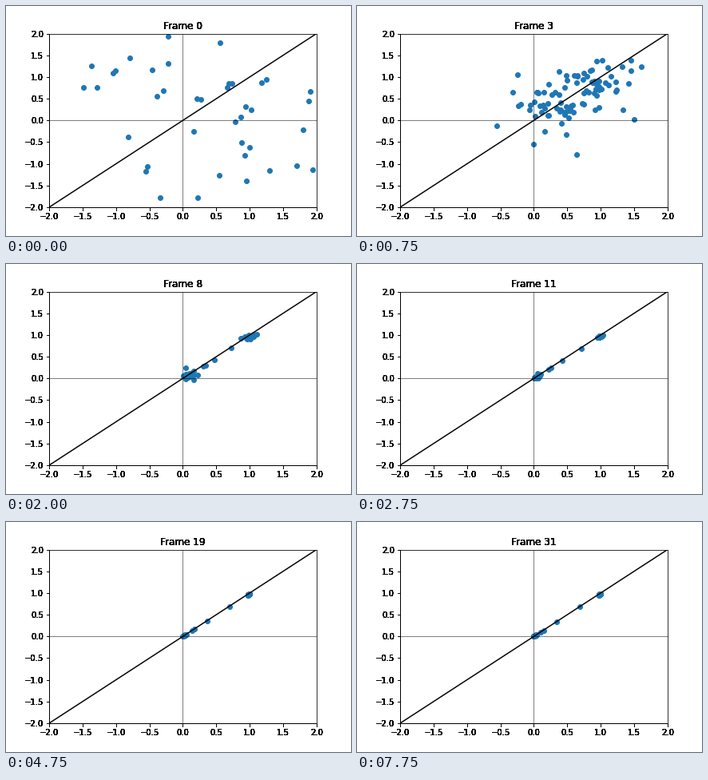
Recreate the animation shown at these times as a matplotlib script. Size 432 by 288 pixels, loop 8000 ms.

```python
import matplotlib.pyplot as plt
import numpy as np
from matplotlib.animation import FuncAnimation

FRAMES, INTERVAL = 32, 250
BOX = [0.125, 0.125, 0.775, 0.755]
TEXT_LAYERS = 10  # stacked axes give the labels their heavy edges
MIDDLE = np.array([0.85, 0.78])

rng = np.random.default_rng(7)

# Resting places along the diagonal: a clump at 0, a few between, a clump at 1
low = 0.04 * rng.random(42) ** 2
between = [0.1, 0.14, 0.34, 0.69]
high = 1 - 0.03 * rng.random(44) ** 2
home = np.concatenate([low, between, high])
count = len(home)
rest = np.column_stack([home, 0.98 * home])

# Each dot starts scattered, sheds its scatter and slides to its resting place
scatter = rng.normal(0, [2.1, 1.85], (count, 2))
shed = 0.45 + 0.27 * rng.random(count) ** 2
slide = np.where((home > 0.05) & (home < 0.9), 0.85, rng.uniform(0.66, 0.8, count))


def positions(n):
    pull = (slide ** n)[:, None]
    noise = (shed ** n)[:, None]
    return rest + (MIDDLE - rest) * pull + scatter * noise


plt.rcParams.update({"font.family": "DejaVu Sans", "font.size": 10})
fig = plt.figure(figsize=(6, 4), dpi=72, facecolor="white")
ticks = np.arange(-2, 2.1, 0.5)
layers = []
for i in range(TEXT_LAYERS):
    ax = fig.add_axes(BOX, label=str(i), facecolor="none" if i else "white")
    ax.set(xlim=(-2, 2), ylim=(-2, 2), xticks=ticks, yticks=ticks)
    if i:
        ax.spines[["top", "right"]].set_visible(False)
    layers.append(ax)

base = layers[0]
dots = base.scatter(*positions(0).T, s=36, color="tab:blue")
base.axhline(0, color="black", linewidth=0.5)
base.axvline(0, color="black", linewidth=0.5)
base.plot([-2, 2], [-2, 2], color="black", linewidth=1.5)
titles = [ax.set_title("Frame 0", fontsize=12) for ax in layers]


def update(n):
    dots.set_offsets(positions(n))
    for title in titles:
        title.set_text(f"Frame {n}")
    return [dots, *titles]


anim = FuncAnimation(fig, update, frames=FRAMES, interval=INTERVAL,
                     repeat=True, repeat_delay=0, blit=False)
plt.show()
```
